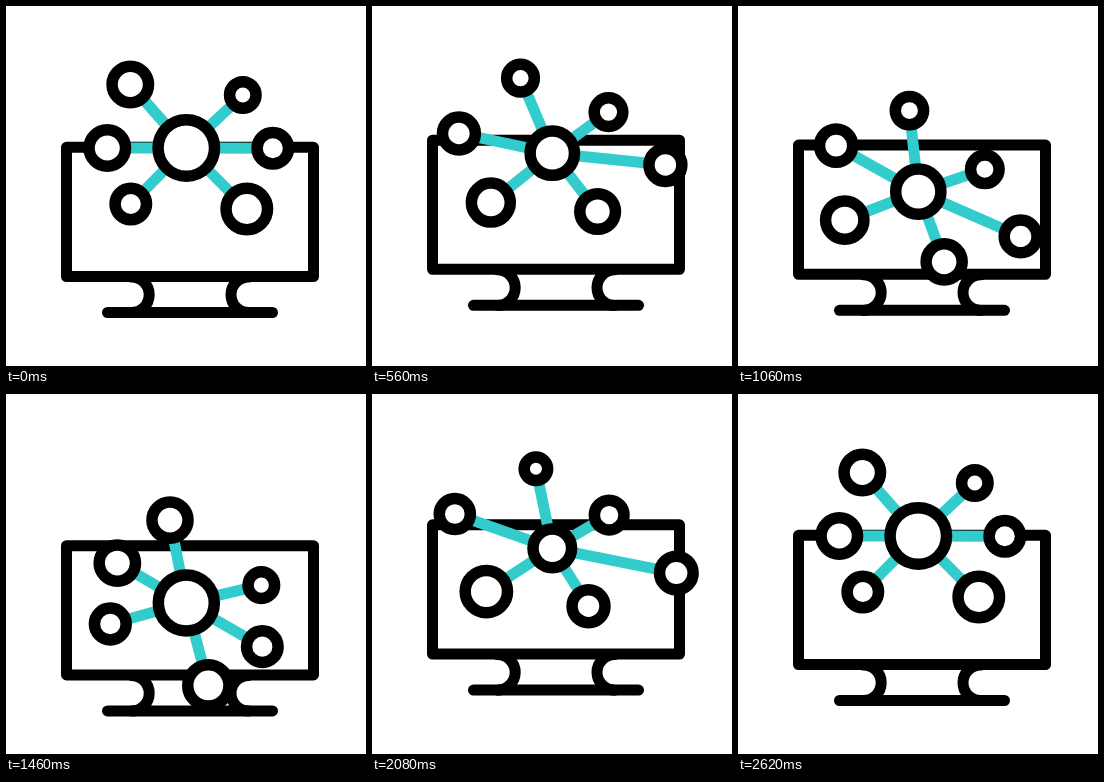
These frames come from a looping animation (360x360 px, 2.82 s). An HTML page:

```html
<!DOCTYPE html>
<html lang="en">
<head>
<meta charset="utf-8">
<title>Network monitor</title>
<style>
  html, body { margin: 0; width: 100%; height: 100%; overflow: hidden; background: #fff; }
  svg { display: block; width: 100%; height: 100%; }
  #monitor { fill: none; stroke: #000; stroke-width: 11; stroke-linecap: round; stroke-linejoin: round; }
  #spokes { stroke: #3cc; stroke-width: 11; }
  #nodes { fill: #fff; stroke: #000; stroke-width: 11.5; }
</style>
</head>
<body>
<svg viewBox="0 0 360 360">
  <g id="monitor">
    <path d="M60.5 141.3H307.5V270.5H60.5Z"/>
    <path d="M125.5 271a17.7 17.8 0 0 1 0 35.6M242.7 271a17.7 17.8 0 0 0 0 35.6"/>
    <path d="M101.5 306.5H266.5"/>
  </g>
  <g id="spokes"></g>
  <g id="nodes"></g>
</svg>
<script>
const LOOP = 2820, STEP = 20, START = 200, HALF = 1200;
const STROKE = 11.5, HUB_X = 180.3, HUB_Y = 142;

// Offset from the hub, drift at mid-swing, outer radius at rest and at mid-swing
const satellites = [
  { x: -56, y: -63.5, dx: 24.6, dy: -11.5, r: 24, mid: 17.2 },
  { x: -79, y: 0, dx: -24.7, dy: -14, r: 24, mid: 21.2 },
  { x: -55.5, y: 56, dx: 0, dy: 0, r: 21.5, mid: 27.2 },
  { x: 56.5, y: -53, dx: -8.2, dy: 9, r: 19, mid: 20.7 },
  { x: 86.5, y: 0.2, dx: 42, dy: -2, r: 21.5, mid: 22.6 },
  { x: 60.5, y: 61, dx: -13.7, dy: -12.6, r: 26.5, mid: 22 }
];

const monitor = document.getElementById('monitor');
const add = (parent, tag) => document.getElementById(parent)
  .appendChild(document.createElementNS('http://www.w3.org/2000/svg', tag));
const set = (el, attrs) => {
  for (const key in attrs) el.setAttribute(key, attrs[key]);
};
const clamp = v => Math.min(1, Math.max(0, v));
const smooth = v => v * v * (3 - 2 * v);
const mix = (a, b, k) => a + (b - a) * k;

for (const s of satellites) {
  s.line = add('spokes', 'line');
  s.ring = add('nodes', 'circle');
}
const hub = add('nodes', 'circle');

function drawRing(el, cx, cy, outer) {
  set(el, { cx, cy, r: outer - STROKE / 2 });
}

function render(time) {
  const elapsed = clamp((time - START) / (2 * HALF)) * 2;
  const p = elapsed < 1 ? elapsed : 2 - elapsed;   // out and back
  const travel = smooth(p);
  const swing = smooth(1 - Math.abs(2 * p - 1));   // peaks halfway out
  const lift = p < 0.5 ? -11 * swing : 11 - 22 * swing;
  const hubY = HUB_Y + lift + 57 * travel;
  const turn = Math.PI / 6 * travel;
  const cos = Math.cos(turn), sin = Math.sin(turn);

  set(monitor, { transform: `translate(0 ${lift})` });
  drawRing(hub, HUB_X, hubY, mix(34, 24.6, swing));
  for (const s of satellites) {
    const x = s.x + s.dx * swing, y = s.y + s.dy * swing;
    const cx = HUB_X + x * cos - y * sin;
    const cy = hubY + x * sin + y * cos;
    set(s.line, { x1: HUB_X, y1: hubY, x2: cx, y2: cy });
    drawRing(s.ring, cx, cy, mix(s.r, s.mid, swing));
  }
}

const origin = performance.now();
function tick() {
  const time = (performance.now() - origin) % LOOP;
  render(Math.floor(time / STEP) * STEP);
  requestAnimationFrame(tick);
}
tick();
</script>
</body>
</html>
```
